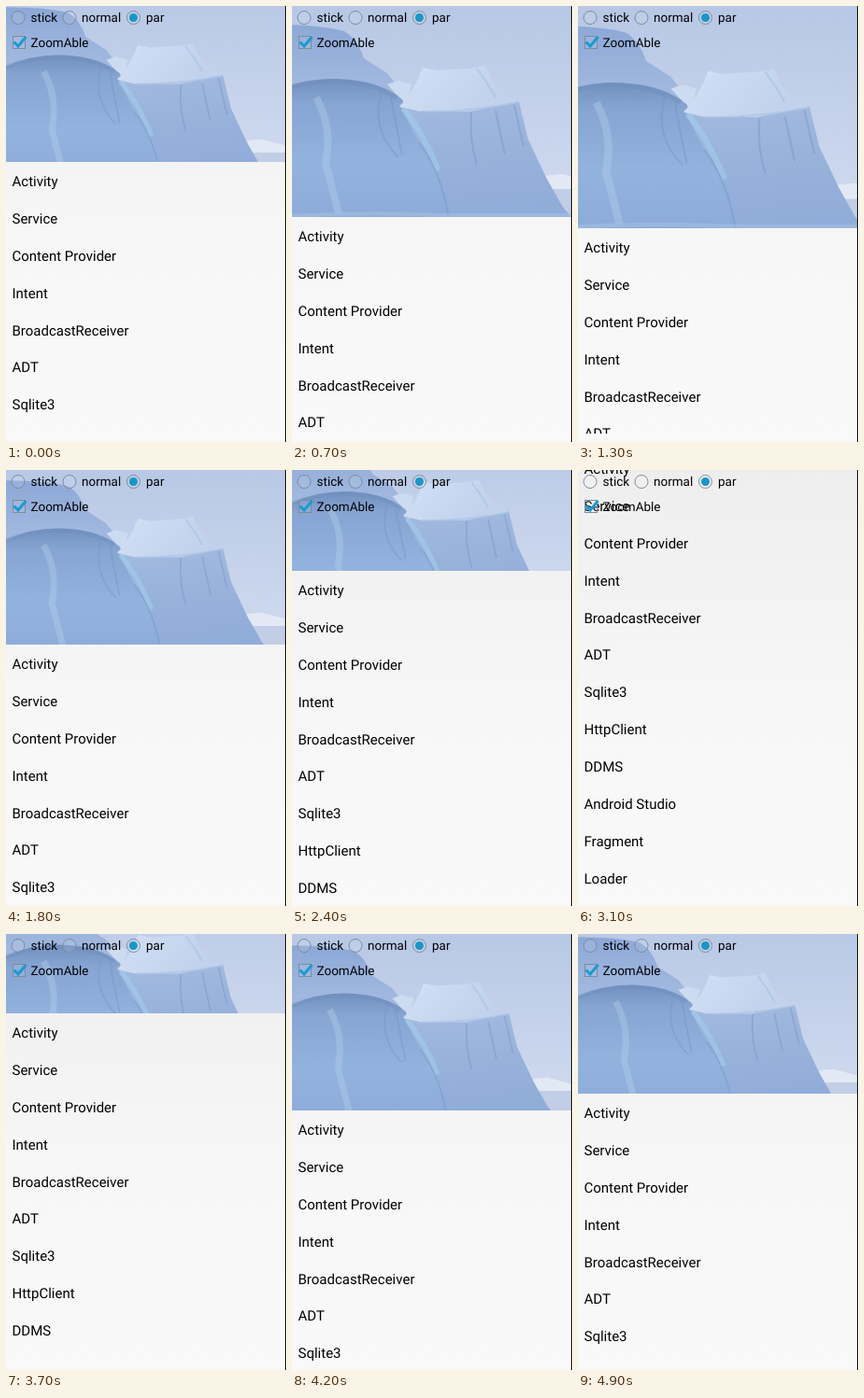
Recreate the animation shown at these times as an HTML page. Size 300 by 467 pixels, loop 5000 ms.

```html
<!DOCTYPE html>
<html lang="en">
<head>
<meta charset="utf-8">
<title>Parallax list header</title>
<style>
  html, body { margin: 0; height: 100%; overflow: hidden; background: #f8f8f8; }
  svg { display: block; width: 100vw; height: 100vh; }
  text { font-family: Roboto, sans-serif; fill: #000; text-rendering: geometricPrecision; }
  #list text { font-size: 15px; }
  #controls text { font-size: 13.5px; }
  .outline { fill: #ffffff18; stroke: #7f8b9c; stroke-width: 1; }
</style>
</head>
<body>
<svg viewBox="0 0 300 467" preserveAspectRatio="none">
  <defs>
    <linearGradient id="sky" x2="0" y2="1">
      <stop offset="0" stop-color="#b7c7e5"/><stop offset="1" stop-color="#d2dcef"/>
    </linearGradient>
    <linearGradient id="ridge" x2="0" y2="1">
      <stop offset="0" stop-color="#8ca8d6"/><stop offset=".3" stop-color="#a0b8df"/>
      <stop offset="1" stop-color="#98b3dc"/>
    </linearGradient>
    <linearGradient id="mound" x2="0" y2="1">
      <stop offset="0" stop-color="#7391bf"/><stop offset=".18" stop-color="#86a5d2"/>
      <stop offset=".6" stop-color="#93b3df"/><stop offset="1" stop-color="#8dabd8"/>
    </linearGradient>
    <linearGradient id="cliff" x2=".15" y2="1">
      <stop offset="0" stop-color="#a3badf"/><stop offset=".5" stop-color="#98b2db"/>
      <stop offset="1" stop-color="#90acd8"/>
    </linearGradient>
    <linearGradient id="cap" x2=".9" y2=".3">
      <stop offset="0" stop-color="#dce9f8"/><stop offset=".3" stop-color="#cddcf2"/>
      <stop offset="1" stop-color="#c2d2ec"/>
    </linearGradient>
    <linearGradient id="paper" gradientUnits="userSpaceOnUse" x1="0" y1="0" x2="0" y2="467">
      <stop offset="0" stop-color="#eeeeee"/><stop offset=".55" stop-color="#f7f7f7"/>
      <stop offset="1" stop-color="#f9f9f9"/>
    </linearGradient>
  </defs>

  <g id="photo">
    <g transform="translate(150) scale(.885) translate(-150)" fill="none">
      <path fill="url(#sky)" d="M-20 0H320V227H-20Z"/>
      <path fill="#c1cee5" d="M270 196H320V227H270Z"/>
      <path fill="#e2e9f5" d="M270 182L290 180L320 188V196H272Z"/>
      <path fill="url(#ridge)" d="M-20 20Q30 20 56 27Q70 35 77 56L102 72L124 100V227H-20Z"/>
      <path fill="#cddbf1" d="M102 84L114 80L128 84L122 106Z"/>
      <path fill="url(#mound)" d="M-20 92Q20 74 62 79Q96 82 118 100L180 227H-20Z"/>
      <path stroke="#6f8cba" stroke-width="5" opacity=".4" d="M-20 93Q20 77 62 82Q92 85 112 98"/>
      <path stroke="#b3cdec" stroke-width="8" opacity=".4" d="M26 98Q44 130 36 168L50 222"/>
      <path fill="url(#cliff)" d="M115 105L135 108H190L243 102L253 143L273 185L290 215L300 227H168Q160 178 136 146Z"/>
      <path fill="url(#cap)" d="M140 66L155 69L190 67L207 64L216 82L230 97L243 103L190 113L137 113L115 108Q132 90 140 66Z"/>
      <path stroke="#a9c3e6" stroke-width="2" opacity=".7" d="M137 113Q190 114 242 103M198 67L210 84L218 98"/>
      <path stroke="#a2d3f0" stroke-width="6" opacity=".5" d="M119 110Q140 135 157 176"/>
      <path stroke="#7492c2" stroke-width="2" opacity=".4" d="M96 92Q84 132 114 162M106 98Q112 130 118 160M168 227Q160 178 136 146M192 114Q190 145 198 170M218 112L228 158M238 106L248 150"/>
      <path stroke="#a9c4e8" stroke-width="4" opacity=".5" d="M-20 226Q70 220 164 224H300"/>
    </g>
  </g>

  <g id="list"><rect width="300" height="520" fill="url(#paper)"/></g>
  <rect y="458" width="300" height="9" fill="#f9f9f9"/>

  <g id="controls">
    <g id="radios"></g>
    <rect class="outline" x="7.5" y="32.5" width="13" height="13"/>
    <path d="M8.5 38.5L13 43L21.5 33" fill="none" stroke="#1b9ad0" stroke-width="3"/>
    <text x="26.5" y="44">ZoomAble</text>
  </g>
  <path d="M299.5 0V467" stroke="#111"/>
</svg>
<script>
const LOOP = 5000, STEP = 100, REST = 200, ROW = 39.88;
const topics = ["Activity", "Service", "Content Provider", "Intent", "BroadcastReceiver", "ADT",
  "Sqlite3", "HttpClient", "DDMS", "Android Studio", "Fragment", "Loader"];

// [time in ms, y of the list's top edge]
const keys = [[0, 167], [300, 167], [700, 226], [1000, 277], [1300, 238], [1600, 203], [1700, 200],
  [2400, 108], [3100, -22], [3400, -22], [3700, 85], [4100, 184], [4400, 200], [4500, 200],
  [4900, 171], [5000, 167]];

const byId = id => document.getElementById(id);
const photo = byId("photo"), list = byId("list"), paper = byId("paper");

function add(parent, tag, attrs, content = "") {
  const node = document.createElementNS("http://www.w3.org/2000/svg", tag);
  for (const name in attrs) node.setAttribute(name, attrs[name]);
  node.textContent = content;
  parent.append(node);
}

topics.forEach((topic, i) => add(list, "text", { x: 6.5, y: 26 + i * ROW }, topic));

[["stick", 13, 26.5], ["normal", 68, 81], ["par", 136.5, 150]].forEach(([label, cx, x]) => {
  add(byId("radios"), "circle", { class: "outline", cx, cy: 12.5, r: 7 });
  if (label === "par") add(byId("radios"), "circle", { cx, cy: 12.5, r: 4.5, fill: "#1b96c6" });
  add(byId("radios"), "text", { x, y: 17 }, label);
});

function listTop(time) {
  const next = keys.findIndex(key => key[0] > time);
  const [t0, y0] = keys[next - 1], [t1, y1] = keys[next];
  return y0 + (y1 - y0) * (time - t0) / (t1 - t0);
}

function draw(now) {
  const top = Math.round(listTop(Math.floor(now % LOOP / STEP) * STEP));
  const zoom = Math.max(1, top / REST);
  const shift = Math.min(0, (top - REST) / 2);
  photo.setAttribute("transform", `translate(150 ${shift}) scale(${zoom}) translate(-150)`);
  list.setAttribute("transform", `translate(0 ${top})`);
  // The page shading stays fixed while the rows scroll over it.
  paper.setAttribute("gradientTransform", `translate(0 ${-top})`);
  requestAnimationFrame(draw);
}
draw(performance.now());
</script>
</body>
</html>
```
